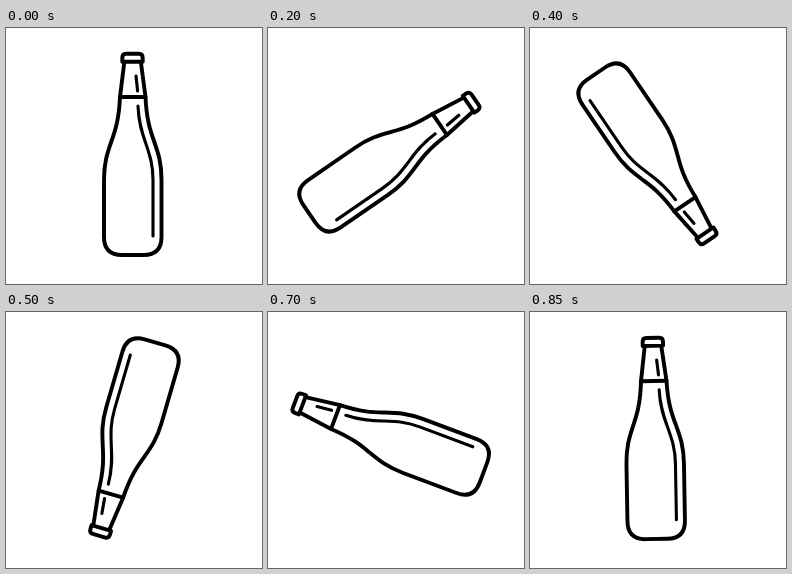
An HTML page that plays this animation: 256x256 px, repeating every 0.95 s.

```html
<!DOCTYPE html>
<html lang="en">
<head>
<meta charset="utf-8">
<title>Spinning bottle</title>
<style>
  html, body { margin: 0; width: 100%; height: 100%; overflow: hidden; background: #fff; }
  svg { display: block; width: 100vw; height: 100vh; }
  #bottle { fill: none; stroke: #000; stroke-width: 3.9; stroke-linecap: round; stroke-linejoin: round; }
  .shine { stroke-width: 3.1; }
</style>
</head>
<body>
<svg viewBox="0 0 256 256">
  <!-- drawn around its own centre -->
  <g id="bottle">
    <g transform="translate(-126.6 -126)">
      <path d="M116.3 33.8V30Q116.3 25.8 120 25.8H133Q136.7 25.8 136.7 30V33.8Z"/>
      <path d="M118.2 35L114 69C113 92 109 103 105.5 113C101 126 98 135 98 152V209Q98 227 116 227H137.5Q155.500 227 155.500 209V152C155.500 135 152.500 126 148 113C144.500 103 140.500 92 139.500 69L135 35"/>
      <path d="M114 69H139.5"/>
      <path class="shine" d="M130 48L131.600 63"/>
      <path class="shine" d="M132 78C132.500 95 136.500 106 140 116C144 128 147 137 147 152V208"/>
    </g>
  </g>
</svg>
<script>
  const LOOP = 950, STEP = 50, LAST = 17;
  const bottle = document.getElementById('bottle');

  // step, angle, centre x, centre y
  const keys = [
    [0, 0, 126.6, 126],
    [3, 40, 125, 128],
    [6, 91.7, 124, 129.5],
    [8, 145.800, 123, 129],
    [12, 245, 119.5, 126],
    [15, 313, 122, 125],
    [17, 359, 124.600, 126]
  ];

  const slope = (a, b, c) => (b[c] - a[c]) / (b[0] - a[0]);

  function tangent(i, c) {
    const prev = keys[Math.max(i - 1, 0)];
    const next = keys[Math.min(i + 1, keys.length - 1)];
    return slope(prev, next, c);
  }

  // cubic Hermite curve through the keys
  function sample(step, c) {
    let i = 0;
    while (i < keys.length - 2 && step >= keys[i + 1][0]) i++;
    const a = keys[i], b = keys[i + 1], span = b[0] - a[0];
    const u = (step - a[0]) / span, v = 1 - u;
    return v * v * (1 + 2 * u) * a[c] + u * u * (3 - 2 * u) * b[c]
      + span * u * v * (v * tangent(i, c) - u * tangent(i + 1, c));
  }

  function draw(now) {
    const step = Math.min(LAST, Math.floor((now % LOOP) / STEP));
    const [angle, x, y] = [1, 2, 3].map(c => sample(step, c).toFixed(2));
    bottle.setAttribute('transform', `translate(${x} ${y}) rotate(${angle})`);
  }

  const start = performance.now();
  function tick() {
    draw(performance.now() - start);
    requestAnimationFrame(tick);
  }
  tick();
</script>
</body>
</html>
```
